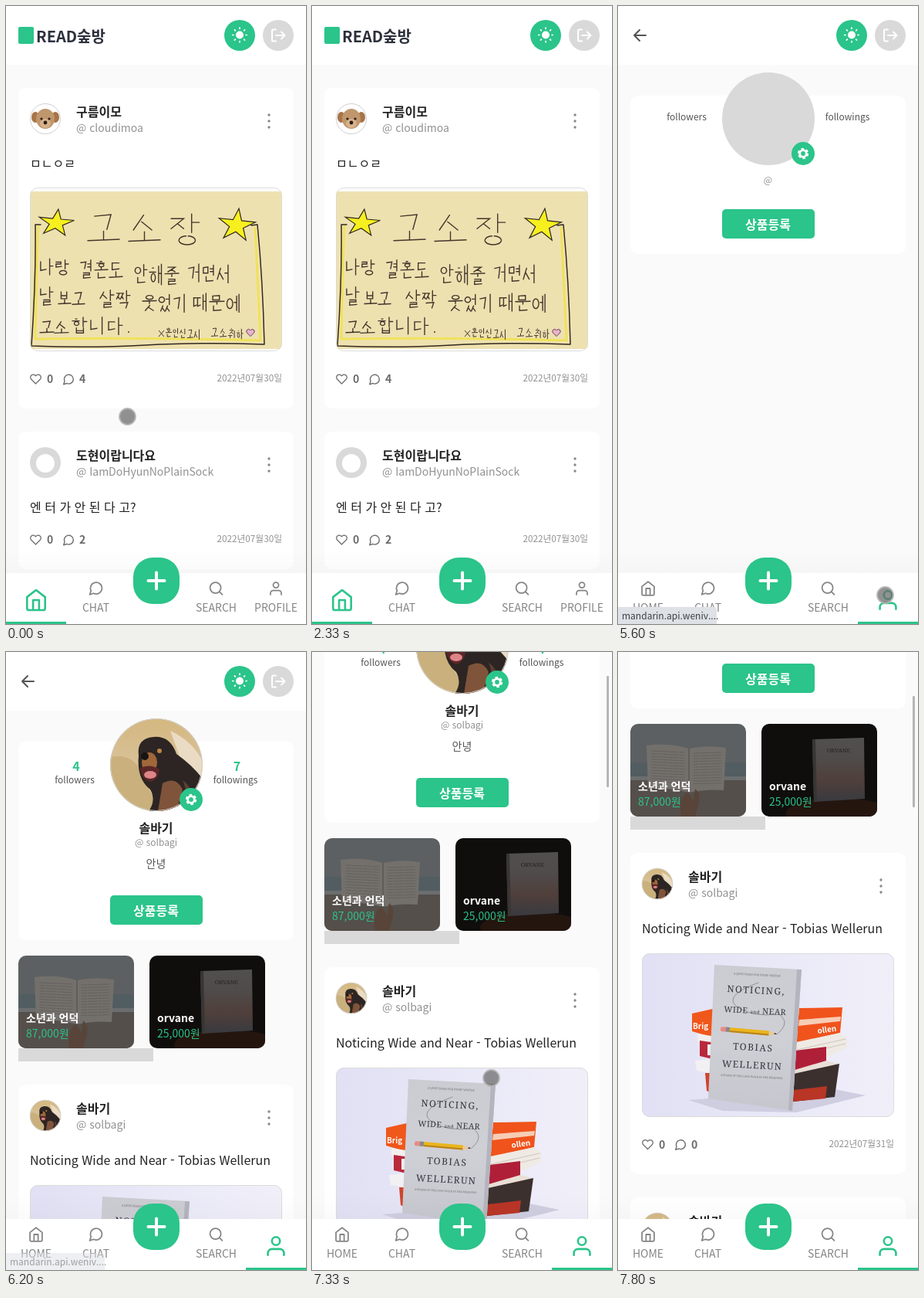
Write an HTML page that moves like this. It is 389 px wide and 800 px high and loops after 8000 ms.

```html
<!DOCTYPE html>
<html lang="ko">
<head>
<meta charset="utf-8">
<style>
html, body { margin: 0; width: 100%; height: 100%; overflow: hidden; background: #fafafa; }
svg { display: block; width: 100%; height: 100%; font-family: "Noto Sans CJK KR", "Noto Sans CJK", "Noto Sans KR", sans-serif; }
text { white-space: pre; }
.serif { font-family: "Noto Serif", "Liberation Serif", serif; }
</style>
</head>
<body>
<svg id="stage" viewBox="0 0 389 800" xmlns="http://www.w3.org/2000/svg"></svg>
<script>
const GREEN = '#2bc48a', GRAY = '#858585', LIGHT = '#d9d9d9', INK = '#222';
const BOLD = 'font-weight="700" ', MID = 'text-anchor="middle" ', END = 'text-anchor="end" ';

const text = (x, y, s, size, fill, more = '') =>
  `<text x="${x}" y="${y}" font-size="${size}" fill="${fill}" ${more}>${s}</text>`;
const rect = (x, y, w, h, fill, r = 0, more = '') =>
  `<rect x="${x}" y="${y}" width="${w}" height="${h}" rx="${r}" fill="${fill}" ${more}/>`;
const disc = (x, y, r, fill, more = '') => `<circle cx="${x}" cy="${y}" r="${r}" fill="${fill}" ${more}/>`;
const path = (d, fill, more = '') => `<path d="${d}" fill="${fill}" ${more}/>`;
const line = (d, color, w, more = '') =>
  path(d, 'none', `stroke="${color}" stroke-width="${w}" stroke-linecap="round" stroke-linejoin="round" ${more}`);
const group = (x, y, body, more = '') => `<g transform="translate(${x} ${y})" ${more}>${body}</g>`;

// Line icons on a 24 unit grid
const ICON = {
  home: 'M3 9l9-7 9 7v11a2 2 0 0 1-2 2H5a2 2 0 0 1-2-2zM9 22V12h6v10',
  chat: 'M21 11.5A8.5 8.5 0 0 1 8.7 19.1L3 21l1.9-5.7A8.5 8.5 0 1 1 21 11.5z',
  search: 'M19 11a8 8 0 1 1-16 0a8 8 0 1 1 16 0M21 21l-4.35-4.35',
  user: 'M20 21v-2a4 4 0 0 0-4-4H8a4 4 0 0 0-4 4v2M16 7a4 4 0 1 1-8 0a4 4 0 1 1 8 0',
  heart: 'M20.84 4.61a5.5 5.5 0 0 0-7.78 0L12 5.67l-1.06-1.06a5.5 5.5 0 0 0-7.78 7.78L12 21.23l8.84-8.84a5.5 5.5 0 0 0 0-7.78z'
};
const place = (x, y, s) => `translate(${x} ${y}) scale(${s}) translate(-12 -12)`;
const icon = (name, x, y, s, color, more = '') =>
  line(ICON[name], color, 2, `transform="${place(x, y, s)}" ${more}`);

// Handwritten Hangul built from strokes
const LEAD = 'ㄱㄲㄴㄷㄸㄹㅁㅂㅃㅅㅆㅇㅈㅉㅊㅋㅌㅍㅎ';
const VOWEL = 'ㅏㅐㅑㅒㅓㅔㅕㅖㅗㅘㅙㅚㅛㅜㅝㅞㅟㅠㅡㅢㅣ';
const TAIL = ' ㄱㄲㄳㄴㄵㄶㄷㄹㄺㄻㄼㄽㄾㄿㅀㅁㅂㅄㅅㅆㅇㅈㅊㅋㅌㅍㅎ';
const PEN = {
  'ㄱ': 'M1 1L9 0L7 9', 'ㄴ': 'M1 0V8L9 7', 'ㄷ': 'M9 1H1V8L9 7', 'ㄹ': 'M1 1H8V4H1V9L9 8',
  'ㅁ': 'M1 1L8 0V9H1Z', 'ㅂ': 'M1 0V9H8V0M1 5H8', 'ㅅ': 'M5 0L0 9M4 4L9 9',
  'ㅇ': 'M5 1A4 4 0 1 0 6 1', 'ㅈ': 'M1 1H9L1 9M5 5L9 9', 'ㅊ': 'M4 -1H6M1 2H9L1 9M5 6L9 9',
  'ㅎ': 'M4 0H6M0 3H9M5 4A3 3 0 1 0 6 4',
  'ㅏ': 'M3 -1V10M3 4H9', 'ㅐ': 'M2 0V9M2 4H7M7 -1V10', 'ㅓ': 'M0 4H6M6 -1V10', 'ㅔ': 'M0 4H4M4 0V9M8 -1V10',
  'ㅕ': 'M0 3H6M0 6H6M6 -1V10', 'ㅣ': 'M5 -1V10', 'ㅗ': 'M5 0V6M0 7L10 6', 'ㅜ': 'M0 3L10 2M5 3V9',
  'ㅟ': 'M0 3H6M3 3V9M9 -9V9'
};
const PAIR = { 'ㅉ': 'ㅈ', 'ㄸ': 'ㄷ', 'ㅆ': 'ㅅ' };

function stroke(j, x, y, w, h) {
  if (PAIR[j]) return stroke(PAIR[j], x, y, w * .48, h) + stroke(PAIR[j], x + w * .52, y, w * .48, h);
  return `<path d="${PEN[j]}" transform="translate(${x} ${y}) scale(${w / 10} ${h / 10})" vector-effect="non-scaling-stroke"/>`;
}
function syllable(c, x, y, w, h) {
  const n = c.charCodeAt(0) - 0xAC00, v = Math.floor(n % 588 / 28), tail = TAIL[n % 28];
  const top = tail === ' ' ? h : h * .56, lead = LEAD[Math.floor(n / 588)];
  const flat = v > 7 && v < 20;
  let out = flat
    ? stroke(lead, x + w * .15, y, w * .65, top * .55) + stroke(VOWEL[v], x, y + top * .55, w, top * .45)
    : stroke(lead, x, y + top * .1, w * .5, top * .75) + stroke(VOWEL[v], x + w * .58, y, w * .4, top);
  if (tail !== ' ') out += stroke(tail, x + w * .2, y + h * .64, w * .65, h * .36);
  return out;
}
const write = (s, x, y, w, h, step) =>
  [...s].map((c, i) => syllable(c, x + i * step, y + i * .7, w, h)).join('');

function star(cx, cy, rx, ry) {
  const p = [];
  for (let i = 0; i < 10; i++) {
    const a = i * Math.PI / 5 - Math.PI / 2 + .12, k = i % 2 ? .38 : 1;
    p.push((cx + rx * k * Math.cos(a)).toFixed(1) + ' ' + (cy + ry * k * Math.sin(a)).toFixed(1));
  }
  return path('M' + p.join('L') + 'Z', '#f8ef1f', 'stroke="#2d2820" stroke-width="1.2"');
}

const frame = rect(.5, .5, 326, 211, 'none', 10, 'stroke="#dbdbdb"');

function note() {
  const ink = '#42362c';
  const words = write('고소장', 75, 35, 41, 39, 53)
    + write('나랑', 13, 94, 18, 19, 20) + write('결혼도', 65, 95, 17, 23, 19)
    + write('안해줄', 135, 101, 18, 24, 20) + write('거면서', 205, 101, 17, 21, 19)
    + write('날', 13, 130, 18, 23, 20) + write('보고', 37, 135, 16, 18, 18) + write('살짝', 91, 134, 19, 22, 21)
    + write('웃었기', 146, 139, 18, 21, 20) + write('때문에', 212, 139, 19, 21, 21)
    + write('고소', 13, 173, 18, 17, 19) + write('합니다', 55, 169, 20, 20, 23);
  const small = write('혼인신고시', 176, 182, 8, 12, 9.3) + write('고소취하', 235, 182, 9, 12, 11);
  return group(31, 235, `<g clip-path="url(#photo)">${rect(0, 0, 327, 212, '#fff')}${rect(0, 5, 327, 204, '#eee1b0')}
    ${line('M11 50Q8 120 7 196Q150 194 299 198L292 52', '#f0e25a', 3)}
    ${line('M14 48H7Q8 120 2 205Q80 208 150 204T304 203Q302 120 295 48L287 49', '#33291f', 1.5)}
    ${star(34, 46, 24, 18)}${star(268, 49, 25, 22)}
    <g fill="none" stroke="${ink}" stroke-width="1.4" stroke-linecap="round">${words}</g>
    <g fill="none" stroke="${ink}" stroke-width="1">${small}<path d="M167 185l7 8m0-8l-7 8"/></g>
    ${disc(128, 187, 1, ink)}
    ${line(ICON.heart, '#6d3a68', 2, `transform="${place(286, 188, .5)}" style="fill:#e5b6c4"`)}</g>${frame}`);
}

function bookPhoto(y) {
  const serif = 'class="serif" text-anchor="middle"', ink = '#35343c';
  const cover = text(0, -79, 'A QUIET READ FOR EVERY WINTER', 3.6, '#666', serif)
    + text(0, -56, 'NOTICING,', 12, ink, serif + ' letter-spacing="1.5"')
    + text(0, -30, 'WIDE <tspan font-size="6">and</tspan> NEAR', 10.5, ink, serif + ' letter-spacing=".5"')
    + text(0, 18, 'TOBIAS', 12, ink, serif + ' letter-spacing="1.5"')
    + text(0, 41, 'WELLERUN', 12, ink, serif + ' letter-spacing="1.3"')
    + text(0, 53, 'AUTHOR OF THE LONG WALK IN THE MEADOWS', 3.4, '#666', serif);
  return group(31, y, `<g clip-path="url(#photo)">${rect(0, 0, 327, 212, 'url(#lilac)')}
    ${path('M60 190L105 204L200 206L290 184L250 176Z', '#cfcde0')}
    ${path('M65 78L96 71V110L65 101Z', '#f0571b')}${text(66, 98, 'Brig', 10, '#fff', BOLD)}
    ${path('M72 104L96 108V118L72 114Z', '#f3efee')}${path('M75 113L96 116V138L75 133Z', '#b9283b')}
    ${path('M85 118H96V132H85Z', '#eee')}${path('M69 139L96 136V156L71 152Z', '#f2f0f3')}${path('M82 155H96V184L84 178Z', '#cf452c')}
    ${path('M204 71L260 70L257 103L200 116Z', '#f0531c')}${path('M204 86L258 82L257 88L203 94Z', '#f7cdb5')}
    ${text(228, 104, 'ollen', 10, '#fff', BOLD + 'transform="rotate(-8 228 104)"')}
    ${path('M200 115L257 103L266 110V122L236 136L199 146Z', '#efeae3')}${line('M201 125L264 111M201 132L264 117', '#cfc6bd', 1)}
    ${path('M199 126L239 121V140L198 152Z', '#b01f38')}${path('M198 151L239 139L255 143L198 166Z', '#e9dfd6')}
    ${path('M197 156L256 143L250 186L196 192Z', '#3b302e')}${path('M197 177L240 172L238 188L196 192Z', '#b93526')}
    ${path('M94 15L207 21L195 204L86 188Z', 'url(#board)')}${path('M201 21L207 21L195 204L190 203Z', '#b4b4be')}
    ${line('M151 38Q105 55 123 69T178 79Q193 90 176 104', '#777', .7)}
    <g transform="translate(145 108) rotate(3)">${cover}</g>
    <g transform="translate(102 98) rotate(5)">${rect(0, -3, 9, 6, '#e68b86', 2)}${rect(7, -3, 5, 6, '#888')}
      ${rect(12, -3, 51, 6, '#e9b51d')}${rect(12, 1, 51, 2, '#b9821a')}${path('M63 -3L74 0L63 3Z', '#e8c99c')}${path('M70 -1L74 0L70 1Z', '#222')}</g></g>${frame}`);
}

const pet = (x, y, s) => `<g transform="translate(${x} ${y}) scale(${s})"><g clip-path="url(#round)">
  ${disc(0, 0, 60, 'url(#field)')}
  ${path('M-60 -10Q-30 -16 -20 10T10 60H-60Z', '#c9b07c')}${path('M18 -44Q48 -30 60 -4V30L34 0Z', '#eadbc4')}
  ${path('M-23 -12Q-26 -34 -4 -36Q18 -38 26 -14Q46 0 60 18V60H-10Q0 46 -8 32Q-26 18 -23 -12Z', '#2c2523')}
  ${path('M8 24Q26 14 34 32L26 60H2Z', '#80543a')}${path('M34 20Q48 28 46 54H34Q42 38 34 20Z', '#5b4030')}
  <ellipse cx="-9" cy="-3" rx="10" ry="13" fill="#a0673a"/>${disc(-15, -11, 5, '#171414')}
  ${path('M-21 4Q-8 -2 4 6Q2 20 -8 22Q-20 18 -21 4Z', '#5b2627')}<ellipse cx="-8" cy="13" rx="8" ry="5" fill="#dd8588"/>
  ${disc(4, -18, 3, '#bd8348')}</g>${disc(0, 0, 59.5, 'none', `stroke="#d3cfc8" stroke-width="${1 / s}"`)}</g>`;

const puppy = group(51, 146, disc(0, 0, 19.5, '#fff', 'stroke="#cfcfcf"')
  + '<ellipse cx="-13" cy="-2" rx="5" ry="7" fill="#a87448"/><ellipse cx="13" cy="-2" rx="5" ry="7" fill="#a87448"/>'
  + '<ellipse rx="12" ry="13" fill="#c0966c"/><ellipse cy="6" rx="7" ry="6" fill="#d6b28c"/>'
  + disc(-5, 0, 1.6, '#2b1d16') + disc(5, 0, 1.6, '#2b1d16') + disc(0, 5, 2.4, '#2b1d16'));

const dots = y => [-8, 0, 8].map(d => disc(341, y + d, 1.7, '#8a8a8a')).join('');
const postHead = (top, name, user, body) => text(91, top + 37, name, 16, INK, BOLD)
  + text(91, top + 57, '@ ' + user, 14, '#919191') + dots(top + 43) + text(31, top + 104, body, 16, INK);

function postFoot(y, day, count, id = '') {
  const tag = s => id && `id="${id}${s}"`;
  return icon('heart', 38.5, y, .65, '#6f6f6f', tag('Heart')) + text(53, y + 5, '0', 14, '#6a6a6a', BOLD + tag('Num'))
    + `<g ${tag('Talk')}>${icon('chat', 81, y + .5, .7, '#6f6f6f')}${text(95, y + 5, count, 14, '#6a6a6a', BOLD)}</g>`
    + text(358, y + 3, `2022년07월${day}일`, 11.75, '#929292', END);
}

function headButtons() {
  let rays = '';
  for (let i = 0; i < 8; i++) rays += `<path d="M0 -8V-9.3" transform="rotate(${i * 45})"/>`;
  return disc(303, 38, 20, GREEN) + group(303, 37.5, disc(0, 0, 5, '#fff')
    + `<g stroke="#fff" stroke-width="1.7" stroke-linecap="round">${rays}</g>`)
    + disc(353, 38, 20, LIGHT) + line('M350 30.5H346.5Q345 30.5 345 32V44Q345 45.5 346.5 45.5H350M350 38H361M357 33.5L361.5 38L357 42.5', '#fff', 2);
}

const home = `<g id="home">${rect(0, 0, 389, 76, '#fff')}${rect(16, 27, 20, 22, GREEN, 2)}
  ${text(39, 47, 'READ숲방', 20, '#2c303c', 'font-weight="900"')}${headButtons()}
  ${rect(16, 106, 357, 415, '#fff', 10)}${puppy}${postHead(106, '구름이모', 'cloudimoa', 'ㅁㄴㅇㄹ')}
  ${note()}${postFoot(483, 30, 4, 'like')}
  ${rect(16, 551, 357, 178, '#fff', 10)}${disc(51, 591, 20, LIGHT)}${disc(51, 592, 12, '#fff')}
  ${postHead(551, '도현이랍니다요', 'IamDoHyunNoPlainSock', '엔 터 가 안 된 다 고?')}${postFoot(691, 30, 2)}</g>`;

function pages() {
  let rows = '';
  for (let i = 0; i < 12; i++)
    rows += `M28 ${35 + i * 3.6}l42 2M82 ${38 + i * 3.6}l36 -1`;
  return path('M21 28Q50 24 76 32Q100 27 124 31L121 86Q98 84 76 89Q50 82 23 84Z', '#73706c')
    + line(rows, '#5c5956', .7, 'stroke-dasharray="7 1.5 4 1"') + line('M76 32V89', '#55514e', 1.2);
}
const shop = `<g id="shop">
  ${group(16, 393, `<g clip-path="url(#tile)">${rect(0, 0, 150, 120, '#5c6062')}${rect(0, 50, 150, 20, '#525d61')}
    ${rect(0, 68, 150, 5, '#6b6d6e')}${rect(0, 73, 150, 47, '#544f4a')}${pages()}
    ${path('M66 120Q62 98 74 88L82 100L84 84Q92 90 88 106L84 120Z', '#584438')}</g>`)}
  ${text(26, 479, '소년과 언덕', 14, '#fff', BOLD)}${text(26, 499, '87,000원', 14, GREEN)}
  ${group(186, 393, `<g clip-path="url(#tile)">${rect(0, 0, 150, 120, '#100e0d')}
    <ellipse cx="100" cy="116" rx="68" ry="20" fill="#24160f"/>${path('M66 20L133 18L134 97L68 101Z', 'url(#dusk)')}
    ${path('M66 20L70 20L72 101L68 101Z', '#383635')}${text(100, 37, 'ORVANE', 7.5, '#262322', 'class="serif" ' + MID)}</g>`)}
  ${text(196, 479, 'orvane', 14, '#fff', BOLD)}${text(196, 499, '25,000원', 14, GREEN)}
  ${rect(16, 513, 175, 17, LIGHT)}</g>`;

const posts = `<g id="posts">${rect(16, 560, 357, 416, '#fff', 10)}${pet(51, 600, 1 / 3)}
  ${postHead(560, '솔바기', 'solbagi', 'Noticing Wide and Near - Tobias Wellerun')}${bookPhoto(690)}${postFoot(937.5, 31, 0)}
  ${rect(16, 1006, 357, 416, '#fff', 10)}${pet(51, 1046, 1 / 3)}${postHead(1006, '솔바기', 'solbagi', '')}</g>`;

const gear = group(240, 191, disc(0, 0, 15, GREEN) + disc(0, 0, 4.3, 'none', 'stroke="#fff" stroke-width="2.8"')
  + disc(0, 0, 6, 'none', 'stroke="#fff" stroke-width="2.4" stroke-dasharray="3.4 2.883"'));

const profile = `<g id="profile">${rect(0, 0, 389, 76, '#fff')}${line('M36 38H21M28 31L21 38L28 45', '#555', 2)}${headButtons()}
  ${rect(16, 116, 357, 205, '#fff', 10, 'id="card"')}${disc(195, 146, 60, LIGHT)}
  <g id="labels">${text(89, 148, 'followers', 12, '#555', MID)}${text(297.5, 148, 'followings', 12, '#555', MID)}</g>
  <g id="blank">${text(194.5, 230, '@', 12, '#919191', MID)}</g>
  <g id="info">${text(91, 154, 4, 16, GREEN, BOLD + MID)}${text(299.5, 154, 7, 16, GREEN, BOLD + MID)}
    ${text(194.5, 234, '솔바기', 16, INK, BOLD + MID)}${text(194.5, 251, '@ solbagi', 12, '#919191', MID)}
    ${text(194.5, 279, '안녕', 14, '#555', MID)}</g>
  <g id="face">${pet(195, 146, 1)}</g>${gear}
  <g id="sell">${rect(135, 263, 120, 38, GREEN, 5)}${text(194.5, 288.5, '상품등록', 16, '#fff', BOLD + MID)}</g>${shop}${posts}</g>`;

const tab = (id, name, x, label) => icon(name, x, 754, .88, GRAY, `id="${id}Icon"`)
  + text(x, 784, label, 14, GRAY, `font-weight="500" ${MID} id="${id}Label"`)
  + rect(x - 39, 797, 78, 3, GREEN, 0, `id="${id}Bar"`);
const nav = rect(0, 702, 389, 32, 'url(#shade)') + rect(0, 734, 389, 66, '#fff') + tab('tabHome', 'home', 39, 'HOME')
  + tab('tabChat', 'chat', 116.5, 'CHAT') + tab('tabFind', 'search', 272.5, 'SEARCH') + tab('tabUser', 'user', 350, 'PROFILE')
  + rect(165, 714, 60, 60, GREEN, 25) + line('M184.5 744H205.5M195 733.5V754.5', '#fff', 4);

const stops = (...c) => c.map((v, i) => `<stop offset="${i / (c.length - 1)}" stop-color="${v}"/>`).join('');
const down = 'x1="0" y1="0" x2="0" y2="1"';
document.getElementById('stage').innerHTML = `<defs>
  <clipPath id="photo">${rect(0, 0, 327, 212, '#000', 10)}</clipPath>
  <clipPath id="tile">${rect(0, 0, 150, 120, '#000', 10)}</clipPath>
  <clipPath id="round">${disc(0, 0, 60, '#000')}</clipPath>
  <linearGradient id="lilac">${stops('#e1e0f4', '#e9e8f7', '#f0eff9')}</linearGradient>
  <linearGradient id="board" ${down}>${stops('#cbcbd2', '#cfcfd6', '#c6c7ce')}</linearGradient>
  <linearGradient id="field" ${down}>${stops('#d4b780', '#d9c298', '#e3d5bb')}</linearGradient>
  <linearGradient id="dusk" ${down}>${stops('#514f4f', '#4f4b4a', '#503f3a', '#383a40')}</linearGradient>
  <linearGradient id="shade" ${down}><stop offset="0" stop-opacity="0"/><stop offset="1" stop-opacity=".018"/></linearGradient></defs>
  ${rect(0, 0, 389, 800, '#fafafa')}${home}${profile}${nav}
  <g id="status"><path d="M0 778H124Q128 778 128 782V800H0Z" fill="#dee1e6"/>${text(5, 794, 'mandarin.api.weniv....', 12, '#3c4043')}</g>
  ${rect(382, 4, 3, 144, '#b5b5b5', 1, 'id="thumb"')}
  <circle id="touch" r="10.4" fill="#666" fill-opacity=".72" stroke="#b4b4b4" stroke-opacity=".9" stroke-width="2"/>`;

const el = {};
document.querySelectorAll('[id]').forEach(n => el[n.id] = n);
const set = (id, key, v) => el[id].setAttribute(key, v);
const show = (id, on) => set(id, 'opacity', +on);

// time, x, y, opacity of the touch point; held until the next row
const TOUCH = [
  [0, 157.5, 531.5, 1], [670, 0, 0, 0],
  [1530, 41.5, 474.5, 1], [1600, 40.5, 477, 1], [1670, 39.5, 478.5, 1],
  [1870, 39.5, 479.2, 1], [1930, 39, 480.5, 1], [2000, 38.5, 481.5, 1], [2330, 0, 0, 0],
  [2400, 38.5, 483, 1], [2530, 38.5, 485.5, 1], [2730, 38.5, 484, 1], [2800, 38.5, 482.5, 1], [2870, 38.5, 481.5, 1], [3670, 0, 0, 0],
  [5270, 345.5, 760.5, .6], [5330, 345.5, 760.5, 1], [5530, 346.5, 762.5, 1], [6000, 0, 0, 0],
  [6600, 254.5, 558.5, 1], [6670, 241, 553.5, 1], [6730, 232.5, 551.5, 1], [7670, 0, 0, 0]
];

function scrollAt(t) {
  if (t < 7070) return 0;
  const d = t - 7020;
  if (t < 7330) return d < 129 ? .0024 * d * d : .62 * (d - 64.5);
  const u = 1 - Math.min(1, (t - 7330) / 470);
  return 300 - 148 * u * u;
}

function setTab(id, x, k) {
  set(id + 'Icon', 'transform', place(x, 754 + 15 * k, .88 + .42 * k));
  set(id + 'Icon', 'stroke', k > .5 ? GREEN : GRAY);
  set(id + 'Label', 'opacity', 1 - k);
  show(id + 'Bar', k > .5);
}

function draw(now) {
  let n = Math.round(now * .015);
  const stepTime = i => Math.round(i * 20 / 3) * 10;
  if (stepTime(n) > now) n--;
  const t = stepTime(n);

  const liked = t >= 2600;
  set('likeHeart', 'stroke', liked ? '#f26e22' : '#6f6f6f');
  set('likeHeart', 'fill', liked ? '#f26e22' : 'none');
  el.likeNum.textContent = liked ? 1 : 0;
  set('likeTalk', 'transform', `translate(${+liked} 0)`);

  const second = t >= 5530, loaded = t >= 5800;
  show('home', !second);
  show('profile', second);
  show('info', loaded);
  show('blank', !loaded);
  show('face', t >= 5870);
  show('shop', t >= 5930);
  show('posts', t >= 6070);
  set('card', 'height', loaded ? 257 : 205);
  set('labels', 'transform', `translate(0 ${loaded ? 22 : 0})`);
  set('sell', 'transform', `translate(0 ${loaded ? 52 : 0})`);

  const k = t < 5530 ? 0 : t < 5600 ? .6 : 1;
  setTab('tabHome', 39, 1 - k);
  setTab('tabUser', 350, k);
  setTab('tabChat', 116.5, 0);
  setTab('tabFind', 272.5, 0);
  set('status', 'opacity', t < 5600 ? 0 : Math.max(0, Math.min(1, (6330 - t) / 260)));

  const s = Math.round(scrollAt(t));
  set('profile', 'transform', `translate(0 ${-s})`);
  show('thumb', t >= 7070);
  set('thumb', 'y', 4 + Math.round(s * .176));

  const p = TOUCH.filter(r => r[0] <= t).pop();
  set('touch', 'cx', p[1]);
  set('touch', 'cy', p[2]);
  set('touch', 'opacity', p[3]);
}

const start = performance.now();
function tick() {
  draw((performance.now() - start) % 8000);
  requestAnimationFrame(tick);
}
tick();
</script>
</body>
</html>
```
